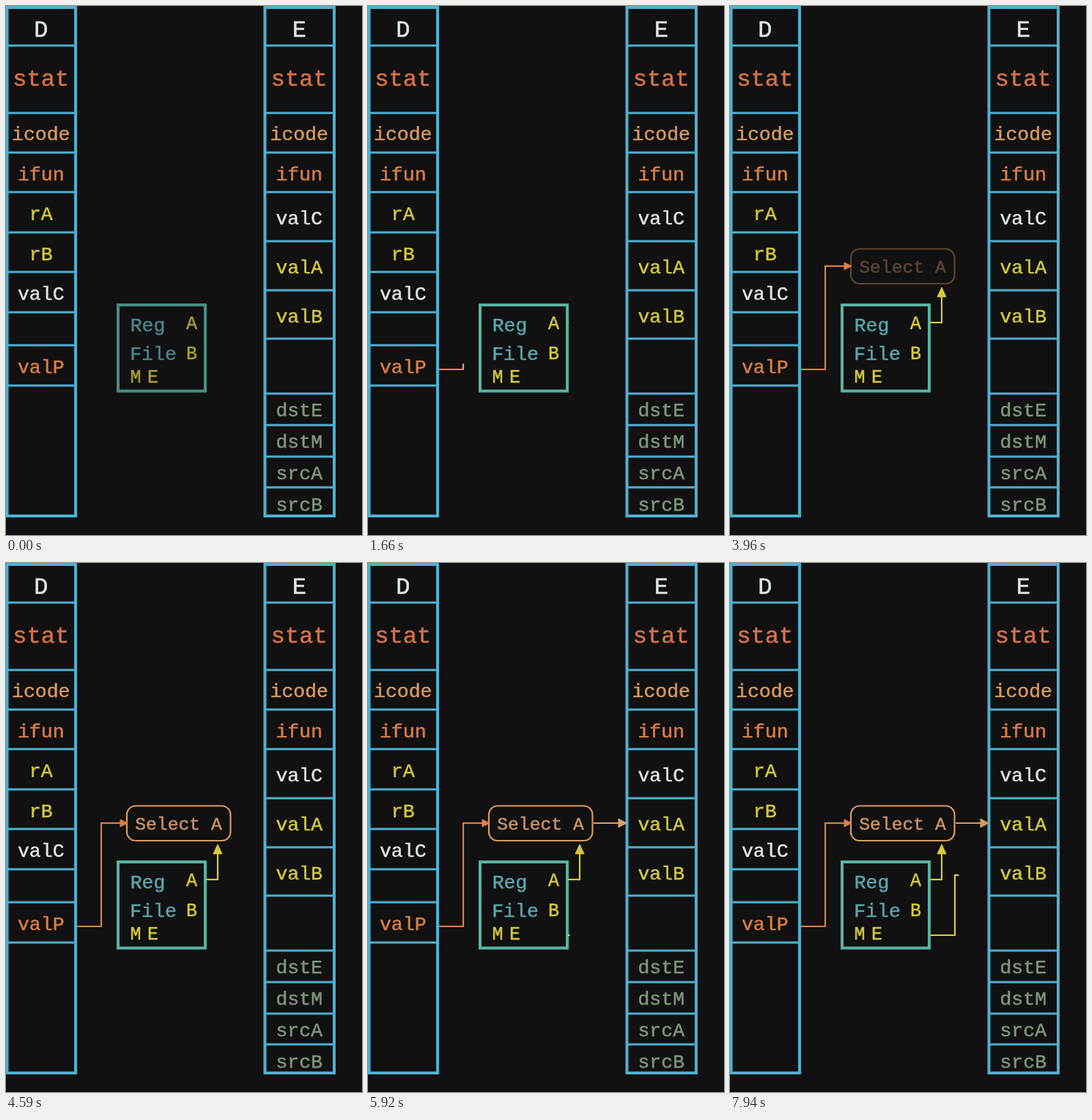
Recreate the animation shown at these times as an HTML page. Size 486 by 722 pixels, loop 8 s.

```html
<!DOCTYPE html>
<html lang="en">
<head>
<meta charset="utf-8">
<title>Pipeline registers</title>
<style>
  html, body { margin: 0; width: 100%; height: 100%; overflow: hidden; background: #111; }
  svg { display: block; width: 100%; height: 100%; filter: blur(0.4px); }
  text { font-family: "Liberation Mono", monospace; text-anchor: middle; white-space: pre; stroke-width: 0.5; }
</style>
</head>
<body>
<svg id="stage" viewBox="0 0 486 722"></svg>
<script>
const LOOP = 8000, STEP = 1010;
const BLUE = '#4fb0d0', TEAL = '#57b3a3', REG = '#5aa7b0', RED = '#da714a', ORANGE = '#dc7e47',
      TAN = '#d99a5e', YELLOW = '#d6c93e', WHITE = '#dfe8e0', SAGE = '#7f987c', PALE = '#e8e8e0';
const stage = document.getElementById('stage');

function add(tag, attrs, parent = stage) {
  const el = document.createElementNS('http://www.w3.org/2000/svg', tag);
  for (const name in attrs) el.setAttribute(name, attrs[name]);
  parent.append(el);
  return el;
}

function label(text, x, baseline, color, size = 26.5, parent = stage) {
  add('text', { x, y: baseline, fill: color, stroke: color, 'font-size': size }, parent).textContent = text;
}

function box(x, y, width, height, stroke, strokeWidth, rx = 0, parent = stage) {
  add('rect', { x, y, width, height, rx, fill: 'none', stroke, 'stroke-width': strokeWidth }, parent);
}

function column(left, right, dividers, cells) {
  box(left, 2, right - left, 694, BLUE, 4);
  for (const y of dividers) {
    add('path', { d: `M${left} ${y}H${right}`, stroke: BLUE, 'stroke-width': 3 });
  }
  for (const [text, baseline, color, size] of cells) {
    label(text, (left + right) / 2 - 0.5, baseline, color, size);
  }
}

const head = [['stat', 109, RED, 32], ['icode', 183, TAN], ['ifun', 238, ORANGE]];

column(1.5, 95, [54, 146, 200, 254, 309, 363, 418, 463, 518], [
  ['D', 42, WHITE, 32], ...head,
  ['rA', 292, YELLOW], ['rB', 346.5, YELLOW], ['valC', 401, WHITE], ['valP', 500.5, ORANGE]
]);
column(353.5, 448, [54, 146, 200, 254, 321, 388, 454, 529, 572, 615, 657], [
  ['E', 42, WHITE, 32], ...head,
  ['valC', 298, WHITE], ['valA', 364.5, YELLOW], ['valB', 431.5, YELLOW],
  ['dstE', 560, SAGE], ['dstM', 603, SAGE], ['srcA', 646, SAGE], ['srcB', 689, SAGE]
]);

const regFile = add('g', {});
box(153, 408, 119, 117.5, TEAL, 4, 0, regFile);
label('Reg', 193.5, 444, REG, 26.5, regFile);
label('File', 201, 482.5, REG, 26.5, regFile);
for (const [text, x, y] of [['A', 253.5, 441], ['B', 253.5, 482], ['M', 177, 514], ['E', 200.5, 514]]) {
  label(text, x, y, YELLOW, 25, regFile);
}

const select = add('g', {});
box(165, 331.5, 141.5, 47.5, TAN, 2.2, 12, select);
label('Select A', 235.5, 364, '#cb9468', 24.7, select);

// Each wire piece is drawn in one step; a tip is outlined in the second half of it.
const wires = [
  [420, ORANGE, 'M97 496H131'],
  [1430, ORANGE, 'M130 496V354'],
  [1430, YELLOW, 'M273 432H290'],
  [2440, ORANGE, 'M130 355H156', 'M156 350L166 355L156 360Z'],
  [2440, YELLOW, 'M289 432V397', 'M283 397L289 384L295 397Z'],
  [4650, TAN, 'M308 355H342', 'M342 349L353 355L342 361Z'],
  [5660, YELLOW, 'M273 508H308'],
  [6670, YELLOW, 'M307 508V425'],
  [7680, YELLOW, 'M307 426H342', 'M342 420L353 426L342 432Z']
].map(([start, color, d, tip]) => ({
  start, color,
  line: add('path', { d, fill: 'none', pathLength: 1, 'stroke-width': 2.2 }),
  tip: tip && add('path', { d: tip, pathLength: 1, 'stroke-width': 1 })
}));

const clamp = v => Math.min(1, Math.max(0, v));
const sigmoid = v => 1 / (1 + Math.exp(-v));
const EDGE = sigmoid(-5);
const smooth = v => clamp((sigmoid(10 * (clamp(v) - 0.5)) - EDGE) / (1 - 2 * EDGE));

function trace(path, progress, color) {
  path.style.visibility = progress > 0 ? 'visible' : 'hidden';
  path.style.strokeDasharray = progress < 1 ? `${progress} 2` : 'none';
  path.style.stroke = color;
}

function draw(t) {
  regFile.style.opacity = 0.78 + 0.22 * clamp(t / 500);
  select.style.opacity = smooth((t - 3500) / STEP);
  for (const { start, color, line, tip } of wires) {
    const progress = smooth((t - start) / STEP);
    const pale = 25 * clamp(1.5 - (t - start) / STEP);
    const tint = `color-mix(in srgb, ${color}, ${PALE} ${pale}%)`;
    trace(line, tip ? clamp(2 * progress) : progress, tint);
    if (tip) {
      const outlined = clamp(2 * progress - 1);
      trace(tip, outlined, tint);
      tip.style.fill = tint;
      tip.style.fillOpacity = outlined ** 3;
    }
  }
}

function frame() {
  draw(performance.now() % LOOP);
  requestAnimationFrame(frame);
}
frame();
</script>
</body>
</html>
```
